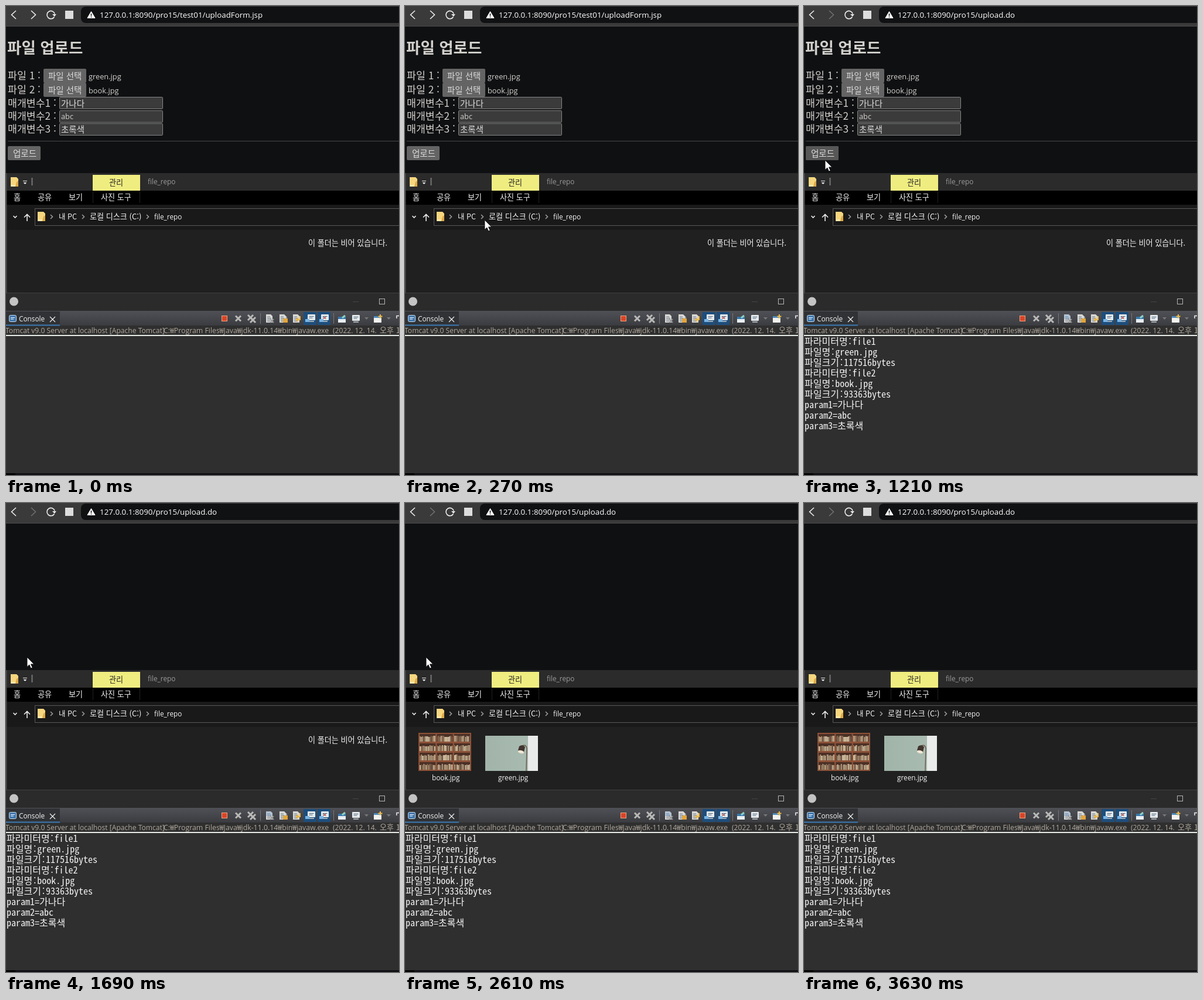
Write an HTML page that moves like this. It is 671 px wide and 800 px high and loops after 3.7 s.

```html
<!DOCTYPE html>
<html lang="ko">
<head>
<meta charset="utf-8">
<title>파일 업로드</title>
<style>
html, body { margin: 0; width: 100%; height: 100%; overflow: hidden; background: #0f1012; }
svg { display: block; width: 671px; height: 800px; }
text { font-family: "Noto Sans CJK KR", "Noto Sans KR", sans-serif; font-size: 13.1px; fill: #f4f4f4; white-space: pre; }
.ui { font-family: "Open Sans", "Noto Sans CJK KR", sans-serif; font-size: 11.8px; }
.url { font-size: 13.35px; fill: #fff; }
.form text { font-size: 17.3px; fill: #d2d0cc; }
.form .btn { font-size: 14.5px; fill: #dcdcdc; }
.form .file { font-size: 12.8px; }
.form .title { font-size: 26.5px; font-weight: bold; }
.console text { font-family: "Noto Sans Mono CJK KR", "Noto Sans Mono", monospace; font-size: 16px; }
.proc { font-size: 12.1px; fill: #b0a79c; }
.line { fill: none; stroke: #eee; stroke-width: 1.6; }
.dim { stroke: #999; }
</style>
</head>
<body>
<svg viewBox="0 0 671 800">
  <defs>
    <linearGradient id="bar" x2="0" y2="1"><stop stop-color="#505157"/><stop offset="1" stop-color="#3b3c40"/></linearGradient>
    <linearGradient id="sky" x2="1" y2="1"><stop stop-color="#1668c0"/><stop offset="1" stop-color="#35a0e8"/></linearGradient>
    <linearGradient id="wall" x2="1"><stop stop-color="#a1b4a9"/><stop offset="1" stop-color="#abbdb3"/></linearGradient>
    <g id="folder">
      <path d="M0 0h10l3 3v13H0z" fill="#f6d67e"/>
      <path d="M10 8l3-2v10H8z" fill="#dda945"/>
      <path d="M1 13h7v3H1z" fill="#fbe9b0"/>
    </g>
    <path id="next" d="M0 0l3.500 3.500L0 7" class="line dim"/>
    <g id="doc">
      <path d="M0 0h8l3 3v11H0z" fill="#d9d9d4"/>
      <path d="M2 4h5M2 6.500h7M2 9h7M2 11.500h5" stroke="#69788e"/>
    </g>
    <g id="monitor">
      <rect width="13" height="10" rx="1" fill="#e6eaec"/>
      <path d="M2.500 3.500h8M2.500 6h6" stroke="#46607c"/>
      <path d="M2 11h9v2H2z" fill="#a4adb4"/>
    </g>
    <path id="cross" d="M0 0l9 9M9 0L0 9" stroke-width="3"/>
    <path id="caret" d="M0 0h7l-3.500 4z" fill="#777"/>
    <g id="image">
      <path d="M0 0h44l18 18v66H0z" fill="#fafafa"/>
      <path d="M44 0l18 18H44z" fill="#d4d6d8"/>
      <path d="M11 23h40v41H11z" fill="url(#sky)"/>
      <circle cx="38" cy="33" r="3.500" fill="#fff"/>
      <path d="M11 52l13-13 27 25H11z" fill="#153f7c"/>
      <path d="M32 47l6-6 13 13v10z" fill="#1d5297"/>
    </g>
  </defs>

  <!-- browser -->
  <rect width="671" height="800" fill="#0f1012"/>
  <rect width="671" height="35" fill="#3a3a3b"/>
  <rect y="34" width="671" height="1" fill="#4a4a4b"/>
  <rect x="128" y="1" width="560" height="28" rx="8" fill="#101113"/>
  <path d="M17 8l-7.500 7 7.500 7" class="line"/>
  <path id="forward" d="M43 8l7.500 7-7.500 7" class="line"/>
  <path d="M82.500 18.500a6.700 6.700 0 1 1 .700-5" class="line"/>
  <path d="M79 14h7l-3.200 4z" fill="#eee"/>
  <rect x="101" y="8" width="14" height="14" fill="#ddd"/>
  <path d="M145.500 9.500l6.500 11h-13z" fill="#fff" stroke="#fff" stroke-linejoin="round"/>
  <path d="M145.500 13v4M145.500 18v1.500" stroke="#111" stroke-width="1.500"/>
  <text id="urlForm" class="ui url" x="160" y="20">127.0.0.1:8090/pro15/test01/uploadForm.jsp</text>
  <text id="urlDone" class="ui url" x="160" y="20">127.0.0.1:8090/pro15/upload.do</text>

  <g id="form" class="form">
    <text class="title" x="2" y="80.500">파일 업로드</text>
    <text x="3" y="125">파일 1 :</text>
    <text x="3" y="149">파일 2 :</text>
    <text x="3" y="172">매개변수1 :</text>
    <text x="3" y="193.500">매개변수2 :</text>
    <text x="3" y="216">매개변수3 :</text>
    <g fill="#646464">
      <rect x="64" y="107" width="73" height="24" rx="2"/>
      <rect x="64" y="131" width="73" height="24" rx="2"/>
      <rect x="3" y="239" width="56" height="24" rx="2"/>
    </g>
    <rect id="hover" x="3" y="239" width="56" height="24" rx="2" fill="#575757"/>
    <g fill="#3b3b3b" stroke="#858585">
      <rect x="91.500" y="155.500" width="176" height="20" rx="1"/>
      <rect x="91.500" y="178.500" width="176" height="20" rx="1"/>
      <rect x="91.500" y="200.500" width="176" height="20" rx="1"/>
    </g>
    <text class="btn" x="72" y="124.500">파일 선택</text>
    <text class="btn" x="72" y="148.500">파일 선택</text>
    <text class="btn" x="12" y="256.500">업로드</text>
    <text class="ui file" x="141" y="125">green.jpg</text>
    <text class="ui file" x="141" y="149">book.jpg</text>
    <text class="btn" x="94" y="171.500">가나다</text>
    <text class="ui file" x="94" y="193">abc</text>
    <text class="btn" x="94" y="215.500">초록색</text>
    <rect x="3" y="230" width="668" height="1" fill="#48494b"/>
  </g>

  <!-- file explorer -->
  <rect y="285" width="671" height="205" fill="#202020"/>
  <rect y="285" width="671" height="30" fill="#2b2b2b"/>
  <rect y="315" width="671" height="24" fill="#000"/>
  <rect y="339" width="671" height="43" fill="#191919"/>
  <rect y="285" width="1.500" height="205" fill="#484848"/>
  <use href="#folder" x="8" y="292"/>
  <path d="M29 298.500h7" stroke="#eee"/>
  <path d="M29.500 301h6l-3 3z" fill="#eee"/>
  <path d="M44.500 293v13" stroke="#777" stroke-width="2"/>
  <rect x="148" y="288" width="81" height="27" fill="#f0ed80"/>
  <text x="176" y="305.500" style="fill:#222">관리</text>
  <text class="ui" x="242" y="304" style="fill:#9a9a9a">file_repo</text>
  <path d="M148.500 316v20M228.500 316v20" stroke="#222"/>
  <text x="13" y="331">홈</text>
  <text x="54" y="331">공유</text>
  <text x="107" y="331">보기</text>
  <text x="162" y="331">사진 도구</text>
  <path d="M12.500 358l3 3 3-3" class="line"/>
  <path d="M36 367v-11M31 360.500l5-5 5 5" class="line"/>
  <rect x="49.500" y="345.500" width="640" height="29" fill="#191919" stroke="#585858"/>
  <use href="#folder" x="54" y="351"/>
  <use href="#next" x="76" y="356"/>
  <use href="#next" x="130" y="356"/>
  <use href="#next" x="240" y="356"/>
  <text x="90" y="364" style="font-size:12.5px">내 PC</text>
  <text x="143" y="364">로컬 디스크 (C:)</text>
  <text class="ui" x="253" y="363.500">file_repo</text>

  <text id="empty" x="516" y="409">이 폴더는 비어 있습니다.</text>
  <g id="icons">
    <use href="#image" x="38" y="396"/>
    <use href="#image" x="152" y="396"/>
  </g>
  <g id="files">
    <g id="photos">
      <g id="books" transform="translate(23 392)"><rect width="90" height="65" fill="#8d5137"/></g>
      <g transform="translate(137 397)">
        <rect width="90" height="60" fill="url(#wall)"/>
        <rect x="73" width="17" height="60" fill="#e9ebea"/>
        <path d="M63 17q7-3 8 5l-1 38" fill="none" stroke="#6b5a4e" stroke-width="1.500"/>
        <path d="M58 18q5-4 10 1l-2 9-10-3z" fill="#41342e"/>
        <ellipse cx="61" cy="27.500" rx="5" ry="2.500" transform="rotate(15 61 27.500)" fill="#f1e6d2"/>
      </g>
    </g>
    <text class="ui" x="46" y="473">book.jpg</text>
    <text class="ui" x="159" y="473">green.jpg</text>
  </g>

  <!-- IDE console -->
  <rect y="489" width="671" height="311" fill="#2f2f2f"/>
  <rect y="489" width="671" height="31" fill="#2b2b2b"/>
  <rect y="489" width="671" height="1" fill="#414141"/>
  <circle cx="13.500" cy="504" r="7.500" fill="#c4c4c4"/>
  <path d="M592 504.500h10" stroke="#444"/>
  <rect x="637.500" y="499.500" width="9" height="9" fill="none" stroke="#b5b5b5"/>
  <rect y="520" width="671" height="25" fill="url(#bar)"/>
  <path d="M0 521h92v24H0z" fill="#303235"/>
  <path d="M0 544.500h92" stroke="#3d7ab5" stroke-width="2"/>
  <rect x="5.500" y="527.500" width="12" height="11" rx="2" fill="#3f76ad" stroke="#c9dcec"/>
  <path d="M8 531.500h7M8 534h5" stroke="#fff"/>
  <text class="ui" x="22" y="538">Console</text>
  <path d="M75 530l9 9M84 530l-9 9" class="line" style="stroke-width:1.200"/>
  <rect x="368.500" y="528.500" width="9" height="9" fill="#d8452a" stroke="#f2a27c"/>
  <g stroke="#b9b9b7">
    <use href="#cross" x="392" y="528.500"/>
    <use href="#cross" x="413" y="527"/>
    <use href="#cross" x="417" y="531"/>
  </g>
  <path d="M434.500 524v18M559.500 524v18" stroke="#77787c"/>
  <use href="#doc" x="444" y="526"/>
  <path id="clearOn" d="M444 526h8l3 3v5h-11z" fill="#6f9ccf" opacity="0"/>
  <path d="M451 534l6 6M457 534l-6 6" stroke="#999" stroke-width="2"/>
  <use href="#doc" x="467" y="526"/>
  <path d="M473 533h8v7h-8z" fill="#e3a53a"/>
  <path d="M475 533v-3h4v3" fill="none" stroke="#ddd"/>
  <use href="#doc" x="490" y="526"/>
  <path d="M502 529v6h-6m3-3l-3 3 3 3" fill="none" stroke="#e9b445" stroke-width="2"/>
  <path d="M508 522h22v22h-22zM532 522h22v22h-22z" fill="#1d4e7d"/>
  <use href="#monitor" x="515" y="526"/>
  <path d="M511 534h7v5h-7z" fill="#78b4e4"/>
  <use href="#monitor" x="538" y="526"/>
  <path d="M535 534h7v5h-7z" fill="#78b4e4"/>
  <path d="M542 530l4 4M546 530l-4 4" stroke="#c83c32"/>
  <path d="M567 530h13v10h-13z" fill="#e8eef2"/>
  <path d="M567 530h13v4h-13z" fill="#3979ad"/>
  <path d="M574 532l5-4" stroke="#8dd0c0" stroke-width="3"/>
  <use href="#monitor" x="591" y="527"/>
  <use href="#caret" x="612" y="531"/>
  <path d="M628 529h13v11h-13z" fill="#f2f2ee"/>
  <path d="M628 529h13v3h-13z" fill="#4e89bd"/>
  <path d="M639 526v7M635.500 529.500h7" stroke="#eebd49" stroke-width="2"/>
  <use href="#caret" x="650" y="531"/>
  <path d="M667 533v-4.500h6" fill="none" stroke="#eee" stroke-width="1.500"/>
  <text class="ui proc" x="-1" y="557.500">Tomcat v9.0 Server at localhost [Apache Tomcat]</text>
  <text class="ui proc" x="269" y="557.500" style="font-size:12.3px">C:₩Program Files₩Java₩jdk-11.0.14₩bin₩javaw.exe</text>
  <text class="ui proc" x="558" y="557.500">(2022. 12. 14.</text>
  <text class="proc" x="638" y="557.500" style="font-size:13.1px">오후 1</text>
  <rect y="561" width="671" height="2" fill="#e6ebe6"/>
  <g id="output" class="console"></g>
  <rect y="797" width="671" height="3" fill="#101014"/>
  <rect y="797" width="16" height="3" fill="#000"/>

  <circle id="click" cx="35.500" cy="263" r="12.500" fill="#e8e020" fill-opacity=".72"/>
  <g id="pointer">
    <path d="M0 0v16.500l3.800-3.600 2.700 6.100 2.700-1.200-2.700-5.900h5.300z" fill="#fff" stroke="#111" stroke-width=".9"/>
  </g>
</svg>
<script>
const LOOP = 3700;
const $ = id => document.getElementById(id);

function make(parent, tag, attrs, text = '') {
  const el = document.createElementNS('http://www.w3.org/2000/svg', tag);
  for (const key in attrs) el.setAttribute(key, attrs[key]);
  el.textContent = text;
  parent.append(el);
}

// Holds each value until the next step.
function play(id, prop, steps) {
  const key = (time, value) => ({ offset: time / LOOP, [prop]: value, easing: 'step-end' });
  const keys = steps.map(([time, value]) => key(time, value));
  keys.push(key(LOOP, steps.at(-1)[1]));
  $(id).animate(keys, { duration: LOOP, iterations: Infinity });
}

function show(id, from, to = LOOP) {
  const steps = [[0, from ? 0 : 1]];
  if (from) steps.push([from, 1]);
  if (to < LOOP) steps.push([to, 0]);
  play(id, 'opacity', steps);
}

['파라미터명:file1', '파일명:green.jpg', '파일크기:117516bytes',
 '파라미터명:file2', '파일명:book.jpg', '파일크기:93363bytes',
 'param1=가나다', 'param2=abc', 'param3=초록색'
].forEach((line, i) => make($('output'), 'text', { x: 1, y: 577.5 + i * 18 }, line));

// Bookshelf: three bays of four shelves.
const tones = ['#c4b08f', '#a58d70', '#d0bfa2', '#8a6c55', '#6b5245', '#b39d80'];
let seed = 7;
const rand = n => (seed = seed * 16807 % 2147483647) % n;
for (let bay = 0; bay < 3; bay++) {
  for (let shelf = 0; shelf < 4; shelf++) {
    const x = 2 + bay * 29.5, y = 2 + shelf * 16;
    make($('books'), 'rect', { x, y, width: 27, height: 13, fill: '#4a3026' });
    for (let i = 0; i < 13; i++) {
      const h = 8 + rand(3);
      make($('books'), 'rect', { x: x + i * 2.07, y: y + 13 - h, width: 2, height: h, fill: tones[rand(6)] });
    }
  }
}

show('hover', 620);
show('click', 950, 1080);
show('urlForm', 0, 1150);
show('urlDone', 1150);
show('output', 1210);
show('form', 0, 1690);
show('empty', 0, 2150);
show('icons', 2150, 2210);
show('files', 2150);
show('photos', 2210);
play('clearOn', 'opacity', [[0, 0], [1210, 0.35]]);
play('forward', 'stroke', [[0, '#eee'], [1150, '#707070']]);
play('files', 'transform', [[0, 'translate(0px, 23px)'], [2610, 'translate(0px, 0px)']]);

const path = [
  [0, 700, 660], [70, 659, 648], [140, 440, 545], [200, 265, 445], [270, 136, 365],
  [340, 48, 312], [410, 2, 285], [480, 18, 274], [550, 34, 270], [620, 36, 266], [690, 36, 263],
  [3210, 42, 274], [3280, 70, 315], [3350, 128, 395], [3420, 215, 510], [3490, 310, 650],
  [3560, 394, 785], [3630, 440, 840]
];
play('pointer', 'transform', path.map(([t, x, y]) => [t, `translate(${x}px, ${y}px)`]));
</script>
</body>
</html>
```
